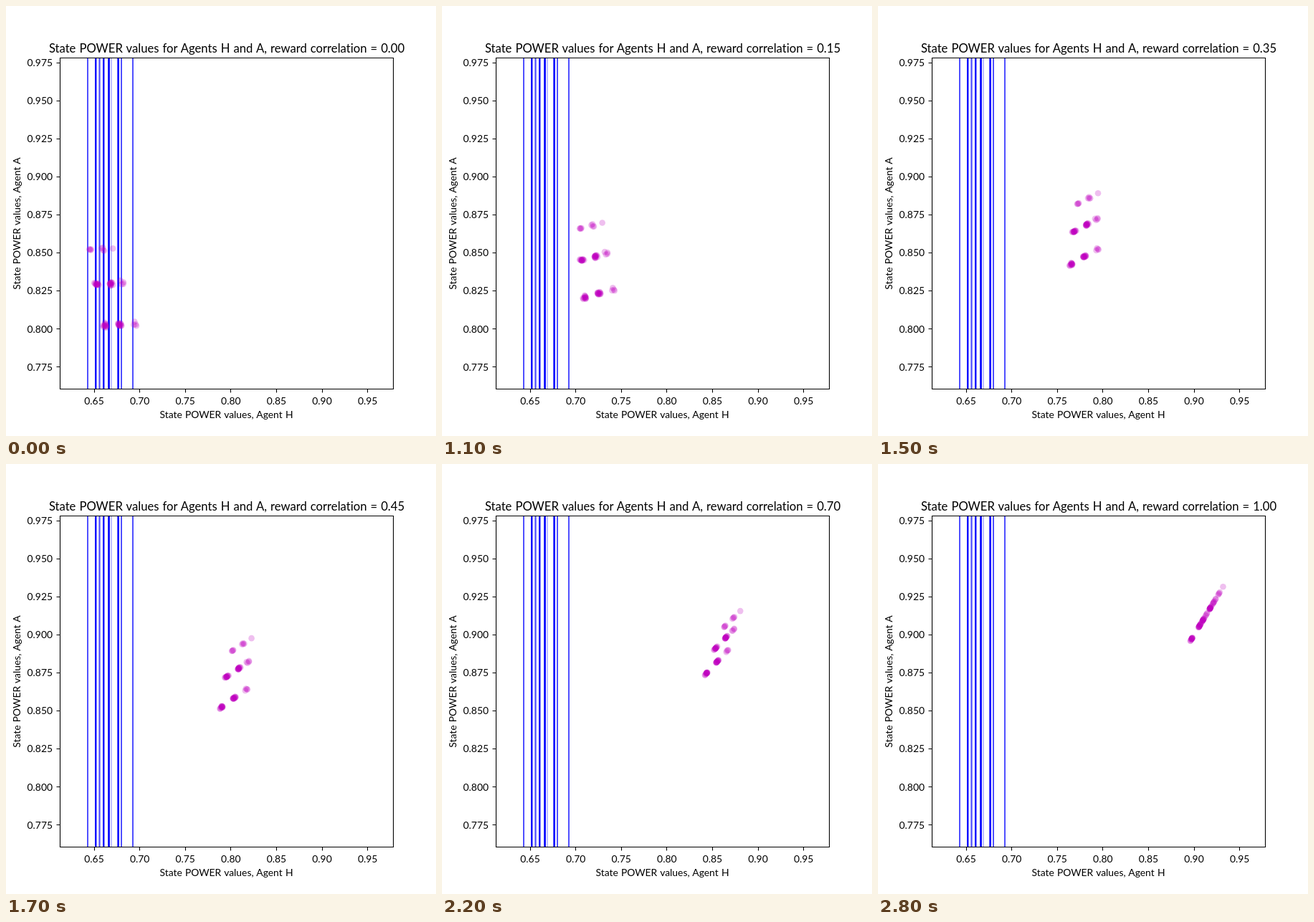
Animation, 600 px wide and 600 px high, one loop 3.2 s. Source, as an HTML page:

```html
<!DOCTYPE html>
<html>
<head>
<meta charset="utf-8">
<style>
  html, body { margin: 0; width: 100%; height: 100%; overflow: hidden; background: #fff; }
  svg { display: block; width: 600px; height: 600px; }
  text {
    font: 13.89px Lato, sans-serif; font-variant-ligatures: none;
    word-spacing: .047em; text-anchor: middle;
  }
  #title { font-size: 16.67px; }
  .right { text-anchor: end; }
  #axes { fill: none; stroke: #000; stroke-width: 1.1; }
  #bars { stroke: #00f; stroke-width: 2; stroke-opacity: .25; }
  #dots { fill: #bf00bf; fill-opacity: .25; }
</style>
</head>
<body>
<svg viewBox="0 0 600 600">
  <g id="bars"></g>
  <g id="dots"></g>
  <path id="axes"></path>
  <g id="labels"></g>
  <text id="title" x="308" y="65"></text>
  <text x="307.5" y="575">State POWER values, Agent H</text>
  <text transform="translate(20 303.5) rotate(-90)">State POWER values, Agent A</text>
</svg>
<script>
const el = id => document.getElementById(id);

let seed = 7;
const random = () => (seed = seed * 16807 % 2147483647) / 2147483647;
const bell = () => (random() + random() + random() - 1.5) * 2.8;
const repeat = (n, make) => Array.from({ length: n }, (_, i) => make(i));

function drawAxes() {
  let axes = 'M75.5 72.5H540.5V534.5H75.5Z', labels = '';
  for (let i = 0; i < 7; i++) {
    const x = 123 + 63.6 * i;
    axes += `M${Math.floor(x) + .5} 534.5v5`;
    labels += `<text x="${x}" y="555.5">${(.65 + .05 * i).toFixed(2)}</text>`;
  }
  for (let i = 0; i < 9; i++) {
    const y = 79.1 + 53.06 * i;
    axes += `M75.5 ${Math.floor(y) + .5}h-5`;
    labels += `<text class="right" x="65" y="${y + 5}">${(.975 - .025 * i).toFixed(3)}</text>`;
  }
  el('axes').setAttribute('d', axes);
  el('labels').innerHTML = labels;
}

// A 3 by 3 grid of clusters, r counting down and j across
const clusters = repeat(9, i => {
  const r = Math.floor(i / 3), j = i % 3, bow = j * (2 - j);
  const n = (r ? [13, 14, 4] : [4, 4, 1])[j];
  const endX = 467.5 - 13 * r - r * r + j * (7 + 1.6 * r) + 1.1 * bow;
  return {
    r, j, n,
    barX: 114.1 + 11 * r + j * (16.8 + 1.3 * r + .35 * r * r) - .25 * j * j,
    start: [
      117.2 + 8.1 * r + 1.15 * r * r + j * (16 + 2.4 * r) + bow * (1.8 - .9 * r),
      339.6 + 44 * r + 4.4 * r * r - .6 * j
    ],
    // With full correlation both values are equal, so all lie on one line
    end: [endX, 194.5 - 1.66 * (endX - 467.5)],
    dots: repeat(n, () => n > 1 ? [bell(), bell()] : [0, 0])
  };
});

function drawBars() {
  el('bars').innerHTML = clusters.map(({ barX, n }) => repeat(n, () => {
    const x = Math.round(barX + (random() - .5) * n * .09);
    return `<path d="M${x} 73V534"/>`;
  }).join('')).join('');
}

// Moves from a to b, ahead of linear by an amount set by bend
const ease = (a, b, c, bend) => a + (b - a) * (c + bend * c * (1 - c));

function draw(c) {
  const spread = 1 - .4 * c;
  el('dots').innerHTML = clusters.map(({ r, j, start, end, dots }) => {
    const x = ease(start[0], end[0], c, .545 + .03 * j - .048 * r - .16 * c);
    const y = ease(start[1], end[1], c, .42 + .05 * j - .035 * r - .08 * c);
    return dots.map(([a, b]) => {
      const dx = a * spread, dy = (b * (1 - c) - 1.66 * a * c) * spread;
      return `<circle cx="${x + dx}" cy="${y + dy}" r="4.3"/>`;
    }).join('');
  }).join('');
  el('title').textContent =
    `State POWER values for Agents H and A, reward correlation = ${c.toFixed(2)}`;
}

let shown = -1;
function tick() {
  const t = performance.now() % 3200;
  const step = Math.min(20, Math.max(0, Math.floor(t / 100) - 8));
  if (step !== shown) draw((shown = step) / 20);
  requestAnimationFrame(tick);
}
drawAxes();
drawBars();
tick();
</script>
</body>
</html>
```
